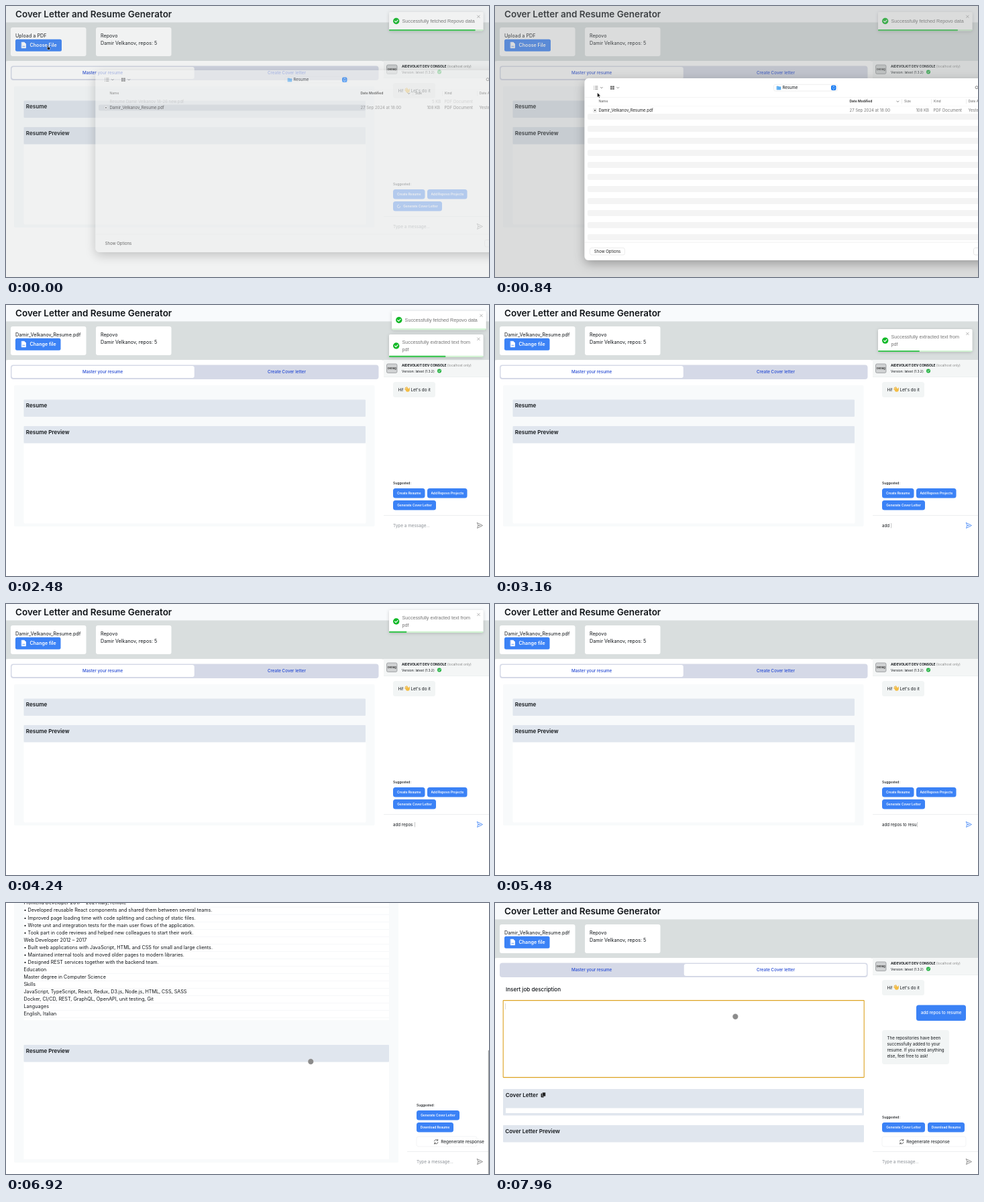
Write an HTML page that moves like this. It is 720x405 px and loops after 8 s.

```html
<!DOCTYPE html>
<html lang="en">
<head>
<meta charset="utf-8">
<title>Resume generator demo</title>
<style>
  html, body { margin: 0; width: 100%; height: 100%; overflow: hidden; background: #fff; }
  svg { display: block; width: 100vw; height: 100vh; }
  text { font-family: Inter, sans-serif; white-space: pre; }
  .toast { font-family: "Liberation Sans", Arial, sans-serif; }
</style>
</head>
<body>
<svg id="stage" viewBox="0 0 720 405">
  <defs>
    <filter id="soft" x="-20%" y="-30%" width="140%" height="190%">
      <feDropShadow dx="0" dy="1" stdDeviation="2.5" flood-opacity=".18"/>
    </filter>
    <filter id="deep" x="-10%" y="-10%" width="120%" height="130%">
      <feDropShadow dx="0" dy="5" stdDeviation="8" flood-opacity=".3"/>
    </filter>
  </defs>
  <g id="scene"></g>
</svg>
<script>
const LOOP = 8000, STEP = 40, TALL = 887;
const INK = '#101418', BLUE = '#3b82f6', LINK = '#2449d3', BAR = '#e0e6ee', PALE = '#f8fafb';
const NAME = 'Damir Velkanov', FILE = 'Damir_Velkanov_Resume.pdf';

const RESUME = [
  NAME,
  '39-000-555-00-00 | anonimo@nulla.test | linkedin.com/in/damir-velkanov | repovo.com/DamirVelkanov',
  'summary',
  'Experienced software engineer with over 15 years in the industry. Based in Italy and working remotely, I have successfully delivered complex projects for both',
  'major corporations and startups. My expertise includes business analysis, system architecture, and team leadership.',
  'Repositories',
  '*AssistCoverLetter', 'Created with TypeScript on October 2, 2024. This project helps to create and edit cover letters using AI assistance.',
  '*greenpath', 'JavaScript project created on February 23, 2024. Description not available.',
  '*patients-notes', 'TypeScript project created on June 20, 2023. Description not available.',
  '*downloads', 'Project created on April 28, 2023. Description not available.',
  '*pastabar', 'JavaScript project created on April 28, 2023. Description not available.',
  'Experience',
  'Senior Frontend Developer 2021 – Present Lumbez SRL Italy, Rome, remote',
  '• Developed a complex web app for the largest telecommunication operator with Tanstack Query/Form/Router and Typescript',
  '• Integrated OpenAPI generators to create API calls, YAML data schemas and TypeScript interface definitions, which reduced backend and frontend integration',
  'efforts by 50%',
  '• Delivered electronic payments management portal with complex async flows, custom UI design system and PKCE authentication flow utilizing Redux-sagas,',
  'Axios, SASS .',
  '• Implemented drag-and-drop calendar with react-beautiful-dnd for meetings scheduling web app.',
  '• Created NPM package of interactive data visualizations (choropleth maps, heatmaps, radar charts, chord diagram, network charts, etc.) with React and D3.js .',
  '• Implemented CI/CD pipelines with Repovo Actions, Docker and Nimbra Devops',
  '• Built microfrontends with NPM: packaged each microfrontend as an NPM package , allowing teams to develop, test, and deploy independently.',
  '• Advocated for well-tested and documented, high quality code. Participated in the development of code guidelines.',
  'Frontend Developer 2017 – 2021 Italy, remote',
  '• Developed reusable React components and shared them between several teams.',
  '• Improved page loading time with code splitting and caching of static files.',
  '• Wrote unit and integration tests for the main user flows of the application.',
  '• Took part in code reviews and helped new colleagues to start their work.',
  'Web Developer 2012 – 2017',
  '• Built web applications with JavaScript, HTML and CSS for small and large clients.',
  '• Maintained internal tools and moved older pages to modern libraries.',
  '• Designed REST services together with the backend team.',
  'Education',
  'Master degree in Computer Science',
  'Skills',
  'JavaScript, TypeScript, React, Redux, D3.js, Node.js, HTML, CSS, SASS',
  'Docker, CI/CD, REST, GraphQL, OpenAPI, unit testing, Git',
  'Languages',
  'English, Italian',
];

const clamp = (v, a = 0, b = 1) => Math.min(b, Math.max(a, v));
const span = (t, a, b) => clamp((t - a) / (b - a));
const ease = u => u * u * (3 - 2 * u);
const lerp = (a, b, u) => a + (b - a) * u;

const rect = (x, y, w, h, fill, rx = 0, extra = '') =>
  `<rect x="${x}" y="${y}" width="${w}" height="${h}" fill="${fill}" rx="${rx}" ${extra}/>`;
const text = (x, y, s, size = 7.2, fill = INK, weight = 400, extra = '') =>
  `<text x="${x}" y="${y}" font-size="${size}" fill="${fill}" font-weight="${weight}" ${extra}>${s}</text>`;
const mid = (x, y, s, size, fill, weight) => text(x, y, s, size, fill, weight, 'text-anchor="middle"');
const lines = (x, y, rows, size, fill, weight) => rows.map((s, i) => text(x, y + i * 9, s, size, fill, weight)).join('');
const path = (d, stroke, w = .8, fill = 'none') =>
  `<path d="${d}" fill="${fill}" stroke="${stroke}" stroke-width="${w}" stroke-linecap="round" stroke-linejoin="round"/>`;
const group = (x, y, body, extra = '') => `<g transform="translate(${x} ${y})" ${extra}>${body}</g>`;
const check = (x, y, r, fill) => `<circle cx="${x}" cy="${y}" r="${r}" fill="${fill}"/>` +
  path(`M${x - r * .45} ${y}l${r * .35} ${r * .35}l${r * .6} ${-r * .65}`, '#fff', r * .25);
const chevron = (x, y) => path(`M${x - 1.5} ${y - .7}l1.5 1.5l1.5 -1.5`, '#555', .7);

function topArea(uploaded) {
  const label = uploaded ? 'Change file' : 'Choose File';
  return rect(0, 0, 720, 82.5, '#d9dede') + rect(0, 0, 720, 24.5, '#f8fafc') +
    text(14, 16.8, 'Cover Letter and Resume Generator', 13.5, INK, 600) +
    rect(7, 32, 112.5, 43, '#fff', 3) + rect(134, 32, 112.5, 43, '#fff', 3) +
    text(14, 46.9, uploaded ? FILE : 'Upload a PDF') +
    rect(14, 49.8, uploaded ? 67.5 : 69, 18, BLUE, 2.5) +
    path('M23.5 54.3h3.8l2.2 2.2v6.3h-6z', '#fff', .8, '#fff') + path('M25 60.3h3', BLUE, .8) +
    text(35.5, 61.3, label, 7.1, '#fff', 600) +
    text(141, 46.9, 'Repovo') + text(141, 57.9, NAME + ', repos: 5');
}

function tabs(edge, second) {
  const w = edge - 14.5, half = w / 2;
  return rect(7, 89.5, w, 21.5, '#d5d9e7', 4) +
    rect(second ? 7 + half + .5 : 8.5, 91, half - 2, 18, '#fff', 3) +
    mid(7 + half / 2, 102.4, 'Master your resume', 6.3, LINK, 500) +
    mid(7 + half * 1.5, 102.4, 'Create Cover letter', 6.3, LINK, 500);
}

function heading(x, y, w, s) {
  return rect(x, y, w, 25.5, BAR, 1) + text(x + 3.3, y + 11.8, s, 8.1, INK, 600);
}

function emptyResume() {
  return rect(12, 120, 537.5, 211, PALE, 2) + heading(26.5, 141.5, 509.5, 'Resume') +
    rect(26.5, 206.5, 510, 120, '#fff', 2) + heading(26.5, 181, 509.5, 'Resume Preview');
}

function fullResume() {
  const rows = RESUME.map((s, i) => {
    const y = 175 + i * 11.05;
    const body = s[0] === '*'
      ? `<tspan font-weight="600">${s.slice(1)}</tspan> | Repository Link` : s;
    return text(26.5, y, body) + (i < 6 || i > 15 ? rect(26.5, y + 3.4, 544.5, .5, '#eceff2') : '');
  }).join('');
  return rect(12, 120, 573, 750, PALE, 2) + rect(26.5, 167, 544.5, 490, '#fff') +
    heading(26.5, 141.8, 544.5, 'Resume') + rows +
    rect(26.5, 720, 544.5, 145, '#fff') + heading(26.5, 694, 544.5, 'Resume Preview');
}

function coverLetter(focused) {
  const frame = `stroke="${focused ? '#dda321' : '#dfe3e8'}" stroke-width="1.1"`;
  return text(16, 131.6, 'Insert job description', 8.1, INK, 500) +
    rect(12.2, 145.6, 538, 115, '#fff', .5, frame) +
    (focused ? rect(15.5, 150, .5, 9, '#bbb') : '') +
    rect(12, 278, 538, 39.5, BAR, 1) + text(15.8, 289.6, 'Cover Letter', 8.1, INK, 600) +
    rect(68.5, 284.5, 4.5, 6, '#222', 1) + rect(70.5, 283, 5, 6, '#222', 1, 'stroke="#e0e6ee" stroke-width=".6"') +
    rect(16, 306.5, 531, 7.5, '#fff') + heading(12, 332, 538, 'Cover Letter Preview');
}

const debugBadge = (x, y) => rect(x, y, 15.5, 13.5, '#d0d2d3', 2, 'stroke="#8b8f91" stroke-width=".7"') +
  mid(x + 7.8, y + 8.3, 'Debug', 4, '#222', 600);
const wave = (x, y) => group(x, y,
  path('M1.5 1.5l3 3.3M3.3 .6l2.4 3.4M.8 3.5l3 3', '#f0b73f', 1.3) +
  '<ellipse cx="4.8" cy="5.3" rx="2.8" ry="2.5" fill="#f3bd45"/>' + path('M7.4 2.2l-.3 2.5', '#f0b73f', 1.2));
const bubble = (x, y, w, h, fill = '#f2f5f5') => rect(x, y, w, h, fill, 3.5);
const pill = (x, y, w, s, indent = 0) =>
  rect(x, y, w, 14.5, BLUE, 3.5) + mid(x + (w + indent) / 2, y + 9.1, s, 4.85, '#fff', 600);

function inputBox(x, y, typed) {
  const value = typed
    ? text(x + 14, y + 17.8, typed + '<tspan font-weight="200">|</tspan>', 6.2)
    : text(x + 14, y + 17.8, 'Type a message...', 6.4, '#8b9096');
  return rect(x, y, 720 - x, .7, '#e5e8ea') + value +
    path(`M702.5 ${y + 11.3}l8 4l-8 4l1.4 -4zm1.4 4h3`, typed ? BLUE : '#777', .8);
}

function chat(x, { narrow, answered, loading, typed }) {
  const head = narrow ? 34 : 25.5, left = x + 14;
  let s = rect(x, 82, 720 - x, TALL, '#fff') + rect(x, 82, 720 - x, head, '#f4f6f6') +
    rect(x, 82 + head, 720 - x, .5, '#e3e6e7');
  const brand = 'AIDEVOLKIT DEV', local = '<tspan font-weight="400" fill="#888">(localhost only)</tspan>';
  if (narrow) {
    s += `<circle cx="612" cy="98.5" r="7" fill="#315fc4"/>` + text(626, 92.5, brand, 4.95, INK, 700) +
      text(626, 100.3, 'CONSOLE ' + local, 4.95, INK, 700) +
      text(626, 108.3, 'Version: latest (1.3.2)', 4.95) + check(681.5, 106.5, 3.1, '#28b446');
  } else {
    s += debugBadge(567.5, 88) + text(590, 92.2, brand + ' CONSOLE ' + local, 4.95, INK, 700) +
      text(590, 100.6, 'Version: latest (1.3.2)', 4.95) + check(646, 98.5, 3.1, '#28b446');
  }
  const hi = narrow ? 123 : 115;
  s += bubble(left, hi, 63, 23) + text(left + 7.5, hi + 13.7, 'Hi!', 6.3) + wave(left + 17, hi + 7) +
    text(left + 26.5, hi + 13.7, "Let's do it", 6.3);
  if (narrow) {
    s += debugBadge(602.5, 158) + bubble(630, 160, 72, 33, BLUE) +
      lines(637.5, 174.2, ['add repos to', 'resume'], 6.2, '#fff', 500) +
      bubble(left, 207, 72, 78) + lines(left + 7.5, 221.3,
        ['The repositories', 'have been', 'successfully added', 'to your resume. If', 'you need anything', 'else, feel free to', 'ask!'], 6.2);
  } else if (answered) {
    s += bubble(628, 152.5, 74, 23.5, BLUE) + text(634.7, 166.4, 'add repos to resume', 6.2, '#fff', 500) +
      bubble(left, 190, 100, 51) + lines(left + 7.5, 204.2,
        ['The repositories have been', 'successfully added to your', 'resume. If you need anything', 'else, feel free to ask!'], 6.2);
  }
  const low = narrow ? TALL - 405 : 0;
  if (answered) {
    const first = low + (narrow ? 310 : 328), next = narrow ? [left, 328 + low] : [left + 68, first];
    s += text(left, first - 5.8, 'Suggested:', 4.95, INK, 500) +
      pill(left, first, 64, 'Generate Cover Letter') + pill(...next, 55, 'Download Resume') +
      rect(left, 349 + low, 702 - left, 15, '#fff', 3, 'stroke="#eef0f1" stroke-width=".7"') +
      group(left + 26, 353 + low, path('M.5 3a2.8 2.8 0 0 1 5-1.2M5.7 .3v1.7h-1.7M5.9 4.6a2.8 2.8 0 0 1-5 1.2M.7 7.3v-1.7h1.7', '#333', .7)) +
      text(left + 36.3, 359.2 + low, 'Regenerate response', 6.4) + inputBox(x, 371.3 + low, '');
  } else {
    const indent = loading ? 9 : 0;
    s += text(left, 268.3, 'Suggested:', 4.95, INK, 500) + pill(left, 274, 47.5, 'Create Resume') +
      pill(left + 51, 274, 59.5, 'Add Repovo Projects') +
      pill(left, 292, 64 + indent, 'Generate Cover Letter', indent) +
      (loading ? path(`M${left + 8.5} 297.2a2.2 2.2 0 1 0 2.2 2.2`, '#fff', .7) : '') +
      inputBox(x, 314.2, typed);
  }
  return s;
}

function toast(x, y, rows, end) {
  const double = rows.length > 1, h = double ? 34 : 28.3;
  return group(x, y,
    rect(571, 0, 140.5, h, '#fff', 2, 'filter="url(#soft)"') +
    check(581.7, double ? 17 : 13.5, 4.7, '#12b928') +
    rows.map((s, i) => text(590.5, (double ? 13.7 : 16) + i * 10.8, s, 7.2, '#757575', 400, 'class="toast"')).join('') +
    path('M702.6 5l3.6 3.6m0 -3.6l-3.6 3.6', '#999', .7) +
    rect(571, h - 2.2, 140.5, 2.2, '#07bc0c', 1, 'opacity=".18"') +
    rect(571, h - 2.2, Math.max(0, end - 571), 2.2, '#3fc655', 1));
}

function toasts(t) {
  const first = ['Successfully fetched Repovo data'], second = ['Successfully extracted text from', 'pdf'];
  if (t < 2400) return toast(0, 9, first, 690 - (t - 840) * .0305);
  let s = '';
  const out = span(t, 2400, 2900);
  if (out < 1) s += toast(160 * out * out, 9, first, 571);
  const gone = span(t, 5040, 5440);
  const y = lerp(44, 9, ease(span(t, 3080, 3340)));
  if (gone < 1) s += toast(160 * gone * gone, y, second, 633 - (t - 3160) * .033);
  return s;
}

function dialog(t) {
  const closing = span(t, 1860, 2120), opening = span(t, 520, 700);
  if (closing === 1) return '';
  const alpha = closing ? 1 - .73 * closing : lerp(.65, 1, opening);
  const dy = closing ? -10.4 * closing : lerp(-12, 0, ease(opening));
  const selected = t >= 1640, early = t < 560, rowY = early ? 164 : 156;
  // The translucent panel lets the grey backdrop through.
  const tone = Math.round(lerp(207, 255, alpha)), panel = `rgb(${tone},${tone + (alpha < 1)},${tone + (alpha < 1)})`;
  let s = rect(133.5, 108, 620, 272, panel, 6, 'filter="url(#deep)"');
  if (!early) for (let k = 0; k < 11; k++) s += rect(138, 161 + 18 * k, 600, 9, '#000', 2, 'opacity=".045"');
  if (selected || early) s += rect(138, rowY - 4.5, early ? 398 : 600, 9, '#d9dbdd', 2);
  s += path('M147.5 120h.1M149.5 120h3.5M147.5 122.2h.1M149.5 122.2h3.5M147.5 124.4h.1M149.5 124.4h3.5', '#666', .7) +
    [0, 1, 2, 3].map(i => rect(172 + 3.2 * (i % 2), i < 2 ? 119.5 : 122.5, 2.6, 2.3, '#666')).join('') +
    chevron(158.8, 122.2) + chevron(183.3, 122.2) +
    rect(415.5, 117.3, 95, 9.8, panel, 2.5, 'stroke="#e8e8e8" stroke-width=".7"') +
    path('M420.3 120h2.3l.8.8h2.6v4.2h-5.7z', '#4fa3ea', .6, '#5aaef2') + text(428.5, 124.4, 'Resume', 6) +
    (selected ? '' : rect(501, 118.5, 7.5, 7.5, '#1b7cf2', 2)) +
    path('M503.4 121.4l1.4 -1.4l1.4 1.4M503.4 123.2l1.4 1.4l1.4 -1.4', selected ? '#555' : '#fff', .7) +
    `<circle cx="718" cy="121.7" r="2" fill="none" stroke="#555" stroke-width=".7"/>` +
    rect(133.5, 136.3, 600, .5, '#e8e8e8') + rect(138, 149, 600, .4, '#efefef') +
    text(154.5, 144.4, 'Name', 5, '#555') + text(528.5, 144.4, 'Date Modified', 5, '#222', 600) +
    chevron(600.5, 142.7) + text(610, 144.4, 'Size', 5, '#666') + text(654, 144.4, 'Kind', 5, '#666') +
    text(705.5, 144.4, 'Date Added', 5, '#666') +
    [606.5, 650.5, 702].map(x => rect(x, 139, .5, 7.5, '#ddd')).join('');
  if (early) s += text(154.5, 156.5, 'Resume Damir Velkanov 18-26 new.pdf', 6, '#c4c4c4') +
    text(635, 156.5, '5 KB', 6, '#c4c4c4') + text(653.5, 156.5, 'PDF Document', 6, '#c4c4c4');
  const y = rowY + 2.2;
  s += rect(146.8, rowY - 2.8, 4.4, 5.6, '#f4f4f4', .5, 'stroke="#bbb" stroke-width=".4"') +
    rect(148, rowY - 1, 2, 2, '#777') + text(154.5, y, FILE, 6, '#222') +
    text(528.5, y, '27 Sep 2024 at 18:00', 6, '#777') + text(647, y, '108 KB', 6, '#777', 400, 'text-anchor="end"') +
    text(653.5, y, 'PDF Document', 6, '#777') + text(705.5, y, 'Yesterday', 6, '#777') +
    rect(133.5, 352.8, 600, .6, '#e6e6e6') +
    (early ? '' : rect(141.5, 361.5, 52, 10.5, panel, 2.5, 'stroke="#e4e4e4" stroke-width=".7"')) +
    mid(167.5, 368.9, 'Show Options', 6, '#222') +
    rect(713.5, 361.5, 30, 10.5, panel, 2.5, 'stroke="#ddd" stroke-width=".7"');
  return group(0, dy, s, `opacity="${alpha}"`);
}

const shade = t => t < 1860 ? lerp(.13, .34, span(t, 520, 700)) : lerp(.34, 0, span(t, 1860, 2120));
const dot = (x, y) => `<circle cx="${x}" cy="${y}" r="4.2" fill="#8b8b8b" stroke="#fff" stroke-opacity=".5" stroke-width=".5"/>`;

function pointer(t) {
  if (t < 560) return group(61.5, 58, path('M.2 .8q.9-1 1.3.3v2.2l2.4.6q.6.3.4 1.3l-.6 2.3h-2.6l-1.9-2.6q.2-.9 1 -.2z', '#fff', .5, '#111'));
  if (t < 1720) {
    const a = ease(span(t, 520, 840)), b = ease(span(t, 960, 1600));
    const x = lerp(lerp(62, 152.5, a), 206, b), y = lerp(lerp(60, 129.5, a), 160, b);
    return group(x, y, path('M0 0v7l1.7-1.5l1.1 2.5l1.1-.5l-1.1-2.4h2.2z', '#fff', .5, '#111'));
  }
  if (t < 2400) return dot(207, 163.3);
  if (t < 5600) return '';
  if (t < 7520) return dot(454.3, 237);
  const u = ease(span(t, 7520, 7720));
  return dot(lerp(418, 358.3, u), lerp(100, 169.8, u));
}

function mainPanel(edge, height) {
  return path(`M0 ${height}V86q0-4 4-4H${edge - 4}q4 0 4 4V${height}z`, 'none', 0, '#fff');
}

function render(t) {
  const narrow = t >= 5600 && t < 7520, answered = t >= 5600, letter = t >= 7520, loading = t < 640;
  const edge = narrow ? 598 : 563;
  const count = t < 2600 ? 0 : Math.floor((t - 2600) / 178) + 1;
  const typed = 'add repos to resu'.slice(0, count);
  const scroll = narrow ? (TALL - 405) * ease(span(t, 5900, 6675)) : 0;
  const body = letter ? coverLetter(t >= 7680) : narrow ? fullResume() : emptyResume();
  let s = group(0, -scroll, topArea(t >= 2400) + mainPanel(edge - .5, TALL) + tabs(edge, letter) + body +
    chat(edge, { narrow, answered, loading, typed }));
  if (scroll > 0 && t < 7240) s += rect(718.8, scroll * 405 / TALL, 1.2, 185, '#9a9c9e', .6);
  if (t < 5480) s += toasts(t);
  if (t < 2120) s += rect(0, 0, 720, 405, '#969899', 0, `opacity="${shade(t)}"`) + dialog(t);
  return s + pointer(t);
}

const scene = document.getElementById('scene');
const start = performance.now();
let shown = -1;
function frame() {
  const t = Math.floor(((performance.now() - start) % LOOP) / STEP) * STEP;
  if (t !== shown) {
    shown = t;
    scene.innerHTML = render(Math.max(t, 520));
  }
  requestAnimationFrame(frame);
}
frame();
</script>
</body>
</html>
```
